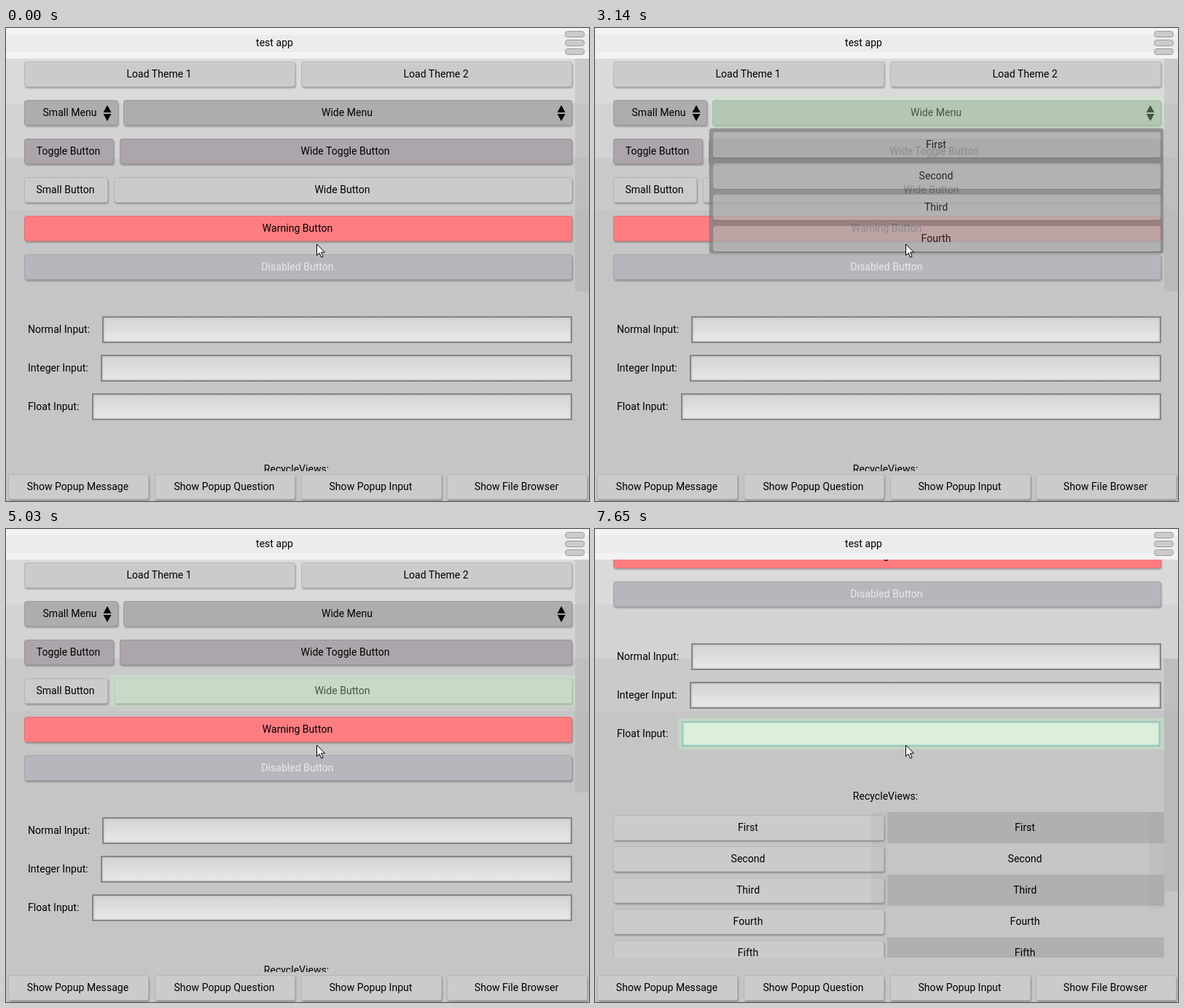
Animation, 800 px wide and 650 px high, one loop 8000 ms. Source, as an HTML page:

```html
<!DOCTYPE html>
<html lang="en">
<head>
<meta charset="utf-8">
<title>test app</title>
<style>
html, body { margin: 0; width: 100%; height: 100%; overflow: hidden; }
body {
  position: relative;
  font: 14px/34px Roboto, sans-serif;
  letter-spacing: .04px;
  color: #000;
  background: linear-gradient(#dadada 104px, #d3d3d3 104px 178px, #cacaca 178px 250px, #c5c5c5 250px);
}
div, svg { position: absolute; box-sizing: border-box; white-space: nowrap; }
#header {
  left: 0; top: 0; width: 800px; height: 42px;
  background: linear-gradient(#f3f3f3 9px, #ececec 9px 33px, #f3f3f3 33px);
}
#view { left: 0; top: 42px; width: 800px; height: 567px; overflow: hidden; }
#content { left: 0; top: -42px; width: 800px; height: 900px; }
.slot { height: 43px; }
.slot.on::after {
  content: ""; position: absolute; inset: 0;
  background: rgba(191, 244, 191, .35);
}
.face {
  left: 4px; right: 4px; top: 4px; height: 35px;
  padding-right: 2px; text-align: center;
  background: #cbcbcb; border-radius: 4px;
  box-shadow: inset 0 0 0 1px rgba(0, 0, 0, .1), 1px 2px 2px rgba(0, 0, 0, .25);
}
.menu { background: #adadad; }
.down .menu { background: #858585; }
.toggle { background: #aca5ab; }
.warning { background: #ff7d80; }
.disabled { background: #b6b7bc; color: #e9e9ec; }
.input {
  left: 4px; right: 4px; top: 3px; height: 37px;
  border: 2px solid #868686;
  background: linear-gradient(#d6d6d6, #dcdcdc 50%, #e0e0e0 55%, #e8e8e8);
  box-shadow: inset 0 0 3px #aaa;
}
.focused .input {
  left: 5px; right: 5px; top: 4px; height: 35px;
  border-color: #7fb0bc; border-radius: 2px;
  background: #eaeaea;
  box-shadow: inset 0 0 3px #8fbcc4, 0 0 1px #a9bcbc;
}
.label { height: 34px; }
.center { text-align: center; }
.bar { background: rgba(150, 150, 150, .12); }
#scrollbar { left: 781px; width: 19px; height: 320px; background: rgba(150, 150, 150, .25); }
#scrollbar.active { background: rgba(150, 150, 150, .5); }
#list { left: 21px; top: 628px; width: 760px; height: 200px; overflow: hidden; }
#popup {
  left: 157px; top: 138px; width: 623px; height: 172px;
  background: #828282; border-radius: 4px; box-shadow: 0 0 2px rgba(0, 0, 0, .35);
}
#popup .face { background: #adadad; box-shadow: 0 1px 1px rgba(0, 0, 0, .15); }
.line { left: 4px; width: 27px; height: 9px; background: #cbcbcb; border: 1px solid #9e9e9e; border-radius: 4px; }
#caret { left: 11px; top: 11px; width: 1px; height: 17px; background: #f00; }
</style>
</head>
<body>
<div id="view"><div id="content"></div><div id="scrollbar"></div></div>
<div id="header"><div class="label center" style="left:0;width:737px;top:3px">test app</div></div>
<svg style="left:426px;top:296px" width="13" height="21">
  <path d="M.5 1v15.5l3.6-3.4 2.6 6 2.4-1-2.6-5.9h5z" fill="#fff" stroke="#000"/>
</svg>
<script>
const $ = id => document.getElementById(id);
const content = $('content'), header = $('header');

function add(parent, cls, box = {}, text = '') {
  const el = document.createElement('div');
  el.className = cls;
  el.textContent = text;
  for (const k in box) el.style[k] = box[k] + 'px';
  parent.append(el);
  return el;
}

function slot(parent, x0, x1, y) {
  return add(parent, 'slot', { left: x0, width: x1 - x0, top: y });
}

function button(parent, x0, x1, y, text, kind = '') {
  const el = slot(parent, x0, x1, y);
  const face = add(el, 'face ' + kind, {}, text);
  if (kind === 'menu') face.insertAdjacentHTML('beforeend',
    '<svg style="right:9px;top:7px" width="12" height="22"><path d="M6 0l5.5 10H.5zM6 22l5.5-10H.5z"/></svg>');
  return el;
}

function input(x0, y, text) {
  add(content, 'label', { left: 30, top: y + 4 }, text);
  const el = slot(content, x0, 781, y);
  add(el, 'input');
  return el;
}

const burger = add(header, 'slot', { left: 763, width: 35, top: 0, height: 41 });
for (const y of [4, 16, 28]) add(burger, 'line', { top: y });

const theme1 = button(content, 21, 401, 42, 'Load Theme 1');
const theme2 = button(content, 401, 781, 42, 'Load Theme 2');
const smallMenu = button(content, 21, 158, 95, 'Small Menu', 'menu');
const wideMenu = button(content, 157, 781, 95, 'Wide Menu', 'menu');
smallMenu.firstChild.style.paddingRight = '4px';
const toggle = button(content, 21, 152, 148, 'Toggle Button', 'toggle');
const wideToggle = button(content, 152, 781, 148, 'Wide Toggle Button', 'toggle');
const small = button(content, 21, 144, 201, 'Small Button');
const wide = button(content, 144, 781, 201, 'Wide Button');
const warning = button(content, 21, 781, 254, 'Warning Button', 'warning');
button(content, 21, 781, 307, 'Disabled Button', 'disabled');
const normal = input(128, 393, 'Normal Input:');
const integer = input(126, 446, 'Integer Input:');
const float = input(114, 499, 'Float Input:');
const caret = add(float, '');
caret.id = 'caret';

add(content, 'label center', { left: 0, width: 797, top: 589 }, 'RecycleViews:');
const list = add(content, '');
list.id = 'list';
const names = ['First', 'Second', 'Third', 'Fourth', 'Fifth'];
const items = names.map((name, i) => {
  const row = add(list, 'center', { left: 380, width: 380, top: i * 43, height: 43 });
  row.style.background = i % 2 ? 'none' : '#b0b0b0';
  add(row, 'label center', { left: 0, width: 378, top: 4 }, name);
  return button(list, 0, 380, i * 43, name);
});
for (const x of [358, 739]) add(list, 'bar', { left: x, width: 21, top: 0, height: 133 });

const popup = add(content, '');
popup.id = 'popup';
names.slice(0, 4).forEach((name, i) => button(popup, 1, 623, 1 + i * 43, name));

[['Message', -1, 200], ['Question', 200, 401], ['Input', 401, 602]].forEach(([name, x0, x1]) =>
  button(document.body, x0, x1, 609, 'Show Popup ' + name));
button(document.body, 601, 802, 609, 'Show File Browser');

// Each step: start time in ms, value
const focusSteps = [
  [0, null], [500, burger], [1030, theme1], [1680, theme2], [2040, smallMenu],
  [2500, wideMenu], [4350, toggle], [4600, wideToggle], [4760, small], [5030, wide],
  [5220, warning], [5390, normal], [5580, integer], [5850, float],
  [6220, items[0]], [6790, float]
];
const popupSteps = [
  [0, 0], [2960, .3], [3050, .6], [3140, .8], [3230, .95], [3320, 1],
  [3890, .66], [3980, .33], [4070, 0]
];
const pressSteps = [[0, false], [2880, true], [3050, false], [3700, true], [4350, false]];

const at = (steps, t) => steps.findLast(s => s[0] <= t)[1];
const targets = focusSteps.map(s => s[1]).filter(Boolean);

function draw(now) {
  const t = now % 8000;
  const current = at(focusSteps, t);
  for (const el of targets) el.classList.toggle('on', el === current);
  wideMenu.classList.toggle('down', at(pressSteps, t));
  popup.style.opacity = at(popupSteps, t);
  const scrolled = t >= 6220;
  content.style.top = (scrolled ? -281 : -42) + 'px';
  $('scrollbar').style.top = (scrolled ? 136 : 0) + 'px';
  $('scrollbar').classList.toggle('active', scrolled && t < 6790);
  float.classList.toggle('focused', t >= 7180);
  caret.hidden = t < 7180 || t >= 7650;
}

const start = performance.now();
function loop() {
  draw(performance.now() - start);
  requestAnimationFrame(loop);
}
draw(0);
requestAnimationFrame(loop);
</script>
</body>
</html>
```
